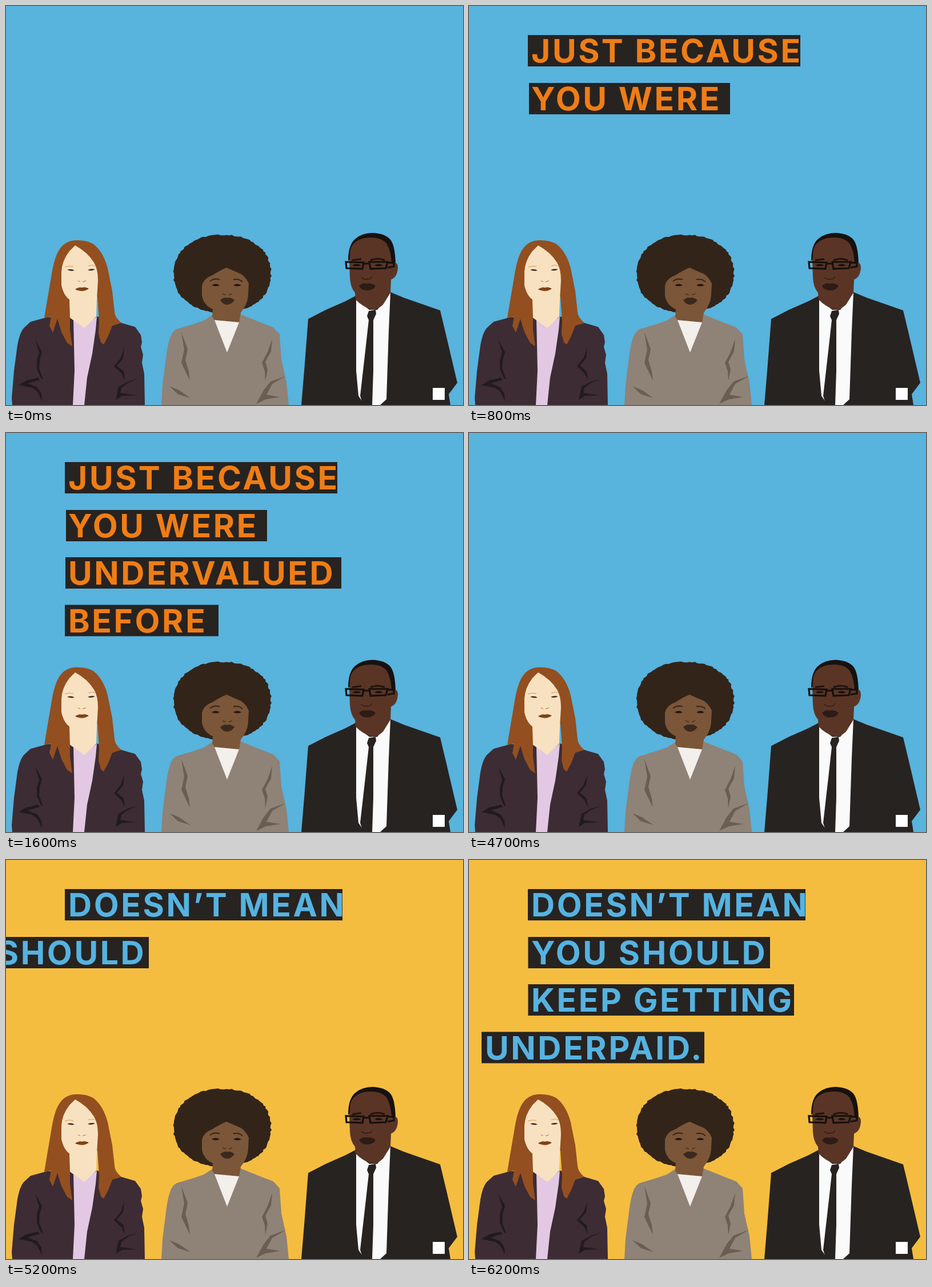
Write an HTML page that moves like this. It is 800 px wide and 700 px high and loops after 8 s.

```html
<!DOCTYPE html>
<html lang="en">
<head>
<meta charset="utf-8">
<title>Just because you were undervalued before</title>
<style>
  html, body { margin: 0; width: 100%; height: 100%; overflow: hidden; }
  svg { display: block; width: 100%; height: 100%; }
  text { font: 700 57px Inter, "Open Sans", sans-serif; letter-spacing: 3.6px; }
</style>
</head>
<body>
<svg viewBox="0 0 800 700">
  <rect id="backdrop" width="800" height="700"/>
  <g id="captions"></g>

  <g id="red-haired-woman">
    <path fill="#3d2c34" d="M11 700L10 688L14 640L20 595Q24 573 31 565L43 554L72 546L160 545L202 556L226 563L236 577L238 590L236 598L240 612L238 626L242 645L243 700Z"/>
    <g fill="#221b1e">
      <path d="M51 585L63 607L59 621L58 636L65 655L61 653L54 637L54 622L58 608Z"/>
      <path d="M22 665L35 657L56 652L59 656L38 662L55 669L62 680L63 693L55 677L46 670Z"/>
      <path d="M207 599L205 618L194 631L206 641L208 657L202 644L189 632L201 617Z"/>
      <path d="M232 654L214 661L202 670L200 679L229 683L203 684L192 691L197 668L213 659Z"/>
    </g>
    <path fill="#e2c8e2" d="M118 549L138 561L159 545L157 568L151 610L142 652L137 700H117L120 640Z"/>
    <path fill="#934f1f" d="M126 411Q104 410 93 428Q84 442 79 476L72 517L67 547L79 545L76 561L82 573L90 549L97 572L107 591L116 597L112 568V510H160L163 553L162 575L166 590L171 594L179 579L186 561L202 556Q190 546 190 536L186 500L178 460Q170 430 152 417Q141 411 126 411Z"/>
    <path fill="#f8e1c0" d="M121 420L111 430Q98 447 97 466V490Q101 508 111 515L112 547L119 552L137 565L158 545L159 515L161 482Q161 461 154 450Q143 432 121 420Z"/>
    <path fill="none" stroke="#d59a55" d="M103 458Q110 455 118 457M144 456Q151 453 157 456"/>
    <path fill="#3a2a22" d="M107 463Q114 460 120 464Q114 466 107 463ZM143 463Q149 460 156 462Q149 466 143 463Z"/>
    <path fill="none" stroke="#a9713a" d="M126 482L130 484M134 484L140 482"/>
    <path fill="#884b1c" d="M121 497Q128 492 133 494Q139 492 145 496Q133 504 121 497Z"/>
    <path fill="none" stroke="#63320f" d="M122 497L144 496"/>
  </g>

  <g id="curly-haired-woman">
    <path id="curls" fill="#33241a"/>
    <path fill="#8f8277" d="M272 700L274 665L281 610Q285 583 291 574Q295 567 305 565L325 559L346 552L363 541L408 540L440 553L468 564L479 576L482 620L491 660L495 700Z"/>
    <path fill="#7b5638" d="M386 459Q372 465 362 472Q345 478 343 492V508Q346 525 362 532L361 545L365 551L408 555L411 538Q424 522 424 505L425 487Q418 471 404 467Z"/>
    <path fill="#f3efeb" d="M365 551L408 555L387 608Z"/>
    <g fill="#6a5d52">
      <path d="M307 572L318 602L314 621L320 641L322 657L315 643L307 626L312 603Z"/>
      <path d="M286 667L303 674L323 688L301 681Z"/>
      <path d="M466 584L464 606L454 624L458 638L454 658L453 641L448 626L458 607Z"/>
      <path d="M490 649L466 663L456 682L480 686L455 690L438 698L451 674L463 659Z"/>
    </g>
    <path fill="none" stroke="#33241a" stroke-width="2" d="M357 483Q364 477 374 480M398 480Q408 478 414 484"/>
    <path fill="#20150f" d="M360 490Q367 485 374 490Q367 493 360 490ZM398 490Q405 485 412 490Q405 493 398 490Z"/>
    <path fill="none" stroke="#4b3220" stroke-width="1.5" d="M379 505L385 507M390 507L396 505"/>
    <path fill="#3a291d" d="M375 516Q382 510 387 512Q393 510 400 516Q394 524 387 524Q380 524 375 516Z"/>
  </g>

  <g id="man">
    <path fill="#272321" d="M517 700L522 640L529 549L560 533L594 518L613 508L673 502L697 512L760 534L771 580L790 661L775 681L778 700Z"/>
    <path fill="#fbfafa" d="M613 515L636 533L650 533L673 502L670 570L666 690L655 700H628L617 684L613 640Z"/>
    <path fill="#272321" d="M635 535L647 533L648 540L643 551V640L641 700H625L620 684L629 605L635 551L632 544Z"/>
    <path fill="#17110f" d="M599 447Q599 418 612 408Q624 398 642 398Q664 399 673 410Q681 420 682 452L674 455L602 445Z"/>
    <path fill="#5a3526" d="M601 448L603 427Q608 411 628 407Q657 403 667 418Q674 431 675 451Q686 447 686 459Q685 476 674 480L673 503L660 524Q650 533 642 533Q624 528 612 515L611 503Q603 494 602 477Z"/>
    <path fill="none" stroke="#20130f" stroke-width="3" d="M606 446L622 444M638 446Q650 441 663 446"/>
    <path fill="#1a100d" d="M606 455Q614 450 622 455Q614 458 606 455ZM645 455Q652 450 660 455Q652 458 645 455Z"/>
    <path fill="none" stroke="#15100e" stroke-width="3.2" d="M595 449L626 450L624 461L596 460ZM636 449H668L665 460L638 461ZM626 452H636M668 450L679 451V457L668 459"/>
    <path fill="none" stroke="#331d15" stroke-width="1.5" d="M622 476Q627 481 633 479Q638 480 641 474"/>
    <path fill="#2d1b15" d="M618 491Q624 485 631 487Q640 485 647 491Q643 499 632 499Q622 499 618 491Z"/>
  </g>

  <rect x="747" y="670" width="21" height="21" fill="#fff"/>
</svg>
<script>
const BLUE = "#58b3dd", YELLOW = "#f4bd40", DARK = "#272321", ORANGE = "#ef7d16";
const STEP = 100, LOOP = 8000, SECOND_START = 47;
const STEPS_PER_LINE = 4, ENTRY_EDGE = 250;
const TOPS = [51, 135, 218, 301.5];

// Each line: text, left edge and right edge of its bar.
const messages = [
  { color: ORANGE, lines: [["JUST BECAUSE", 103, 580], ["YOU WERE", 105, 457], ["UNDERVALUED", 104, 587], ["BEFORE", 103, 372]] },
  { color: "#55b3e1", lines: [["DOESN’T MEAN", 103, 589], ["YOU SHOULD", 103.5, 527], ["KEEP GETTING", 103.5, 569], ["UNDERPAID.", 103, 493]] }
];

const backdrop = document.getElementById("backdrop");
const captions = document.getElementById("captions");

function add(parent, tag, attributes = {}) {
  const node = document.createElementNS("http://www.w3.org/2000/svg", tag);
  for (const key in attributes) node.setAttribute(key, attributes[key]);
  return parent.appendChild(node);
}

const bars = messages.map(({ color, lines }) => lines.map(([label, left, right], i) => {
  const group = add(captions, "g");
  add(group, "rect", { x: left, y: TOPS[i], width: right - left, height: 55, fill: DARK });
  add(group, "text", { x: 109, y: TOPS[i] + 48.3, fill: color }).textContent = label;
  return { group, right };
}));

function curlOutline() {
  const count = 130, points = [];
  const squash = v => Math.sign(v) * Math.abs(v) ** 0.92;
  for (let i = 0; i < count; i++) {
    const angle = i / count * 2 * Math.PI;
    const noise = Math.sin(i * 12.9898) * 43758.5453;
    const size = 0.985 + 0.03 * (noise - Math.floor(noise));
    points.push([
      (378.5 + 85.5 * size * squash(Math.cos(angle))).toFixed(1),
      (469.5 + 68 * size * squash(Math.sin(angle))).toFixed(1)
    ]);
  }
  return "M" + points.join("L") + "Z";
}
document.getElementById("curls").setAttribute("d", curlOutline());

function render(time) {
  const step = Math.floor((time % LOOP) / STEP);
  const current = step < SECOND_START ? 0 : 1;
  const local = step - current * SECOND_START;
  backdrop.setAttribute("fill", step > SECOND_START ? YELLOW : BLUE);

  bars.forEach((lines, message) => lines.forEach(({ group, right }, i) => {
    const age = local - 1 - i * STEPS_PER_LINE;
    const visible = message === current && age >= 0;
    group.setAttribute("visibility", visible ? "visible" : "hidden");
    const progress = Math.min(Math.max(age, 0) / (STEPS_PER_LINE - 1), 1);
    group.setAttribute("transform", `translate(${(ENTRY_EDGE - right) * (1 - progress)} 0)`);
  }));
}

const start = performance.now();
function tick() {
  render(performance.now() - start);
  requestAnimationFrame(tick);
}
tick();
</script>
</body>
</html>
```
